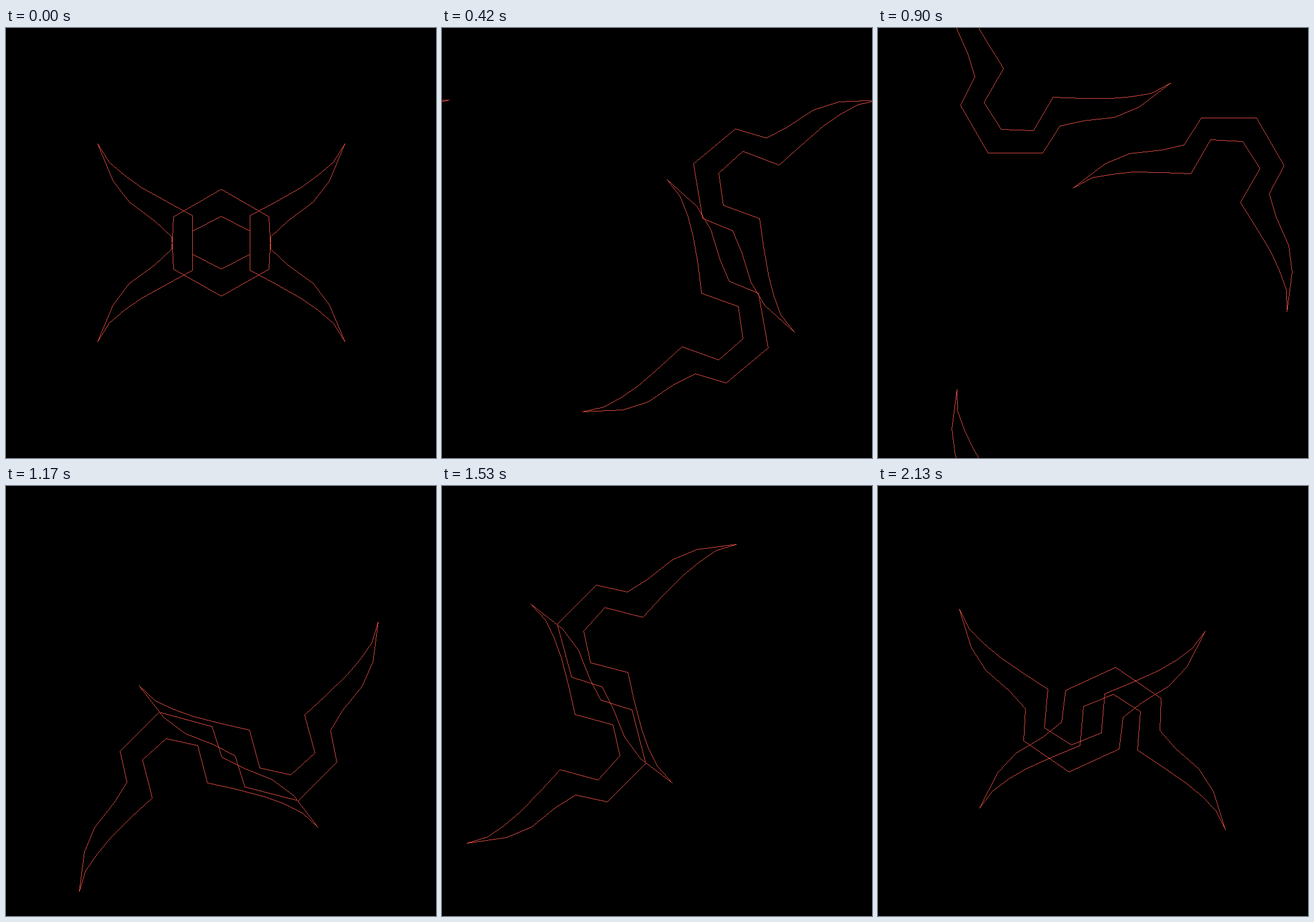
Animation, 748 px wide and 748 px high, one loop 2.16 s. Source, as an HTML page with a canvas:

```html
<!DOCTYPE html>
<html lang="en">
<head>
<meta charset="utf-8">
<title>Orbiting horns</title>
<style>
  html, body { margin: 0; width: 100%; height: 100%; overflow: hidden; background: #000; }
  canvas { display: block; width: 748px; height: 748px; }
</style>
</head>
<body>
<canvas id="stage" width="748" height="748"></canvas>
<script>
const SIZE = 748, STEP_MS = 30, STEPS = 72;
const ctx = document.getElementById('stage').getContext('2d');

// Half outlines, measured from the symmetry axis and the line through the tips.
const inner = [[0, 218], [49.7, 192], [49.7, 124.2], [94.5, 100.7], [139, 75.6], [168.3, 55], [195, 32]];
const tip = [[215, 0]];
const outer = [[188.3, 64.4], [159.6, 101], [115.7, 133.5], [85.6, 161.5], [83, 217.4], [0, 265]];

const half = [...inner, ...tip, ...outer];
const mirrored = half.slice(1, -1).reverse().map(([x, y]) => [-x, y]);
const outline = [...half, ...mirrored];

const wrap = v => ((v % SIZE) + SIZE) % SIZE;

// One-pixel line without antialiasing, wrapping round the stage edges.
function line([x0, y0], [x1, y1]) {
  const n = Math.max(Math.abs(x1 - x0), Math.abs(y1 - y0), 1);
  for (let i = 0; i <= n; i++) {
    const x = Math.round(x0 + (x1 - x0) * i / n);
    const y = Math.round(y0 + (y1 - y0) * i / n);
    ctx.fillRect(wrap(x), wrap(y), 1, 1);
  }
}

// Turns the outline counterclockwise about the stage corner; side is 1 or -1.
function drawShape(angle, side) {
  const c = Math.cos(angle), s = Math.sin(angle);
  const points = outline.map(([px, py]) => {
    const x = SIZE / 2 + px, y = side * (202 + py);
    return [Math.round(x * c + y * s), Math.round(y * c - x * s - 0.6)];
  });
  points.forEach((p, i) => line(p, points[(i + 1) % points.length]));
}

function render(ms) {
  const step = Math.floor(ms / STEP_MS) % STEPS;
  const angle = step * 2 * Math.PI / STEPS;
  ctx.fillStyle = '#000';
  ctx.fillRect(0, 0, SIZE, SIZE);
  ctx.fillStyle = '#dc4b40';
  drawShape(angle, 1);
  drawShape(angle, -1);
}

const start = performance.now();
function tick() {
  render(performance.now() - start);
  requestAnimationFrame(tick);
}
tick();
</script>
</body>
</html>
```
